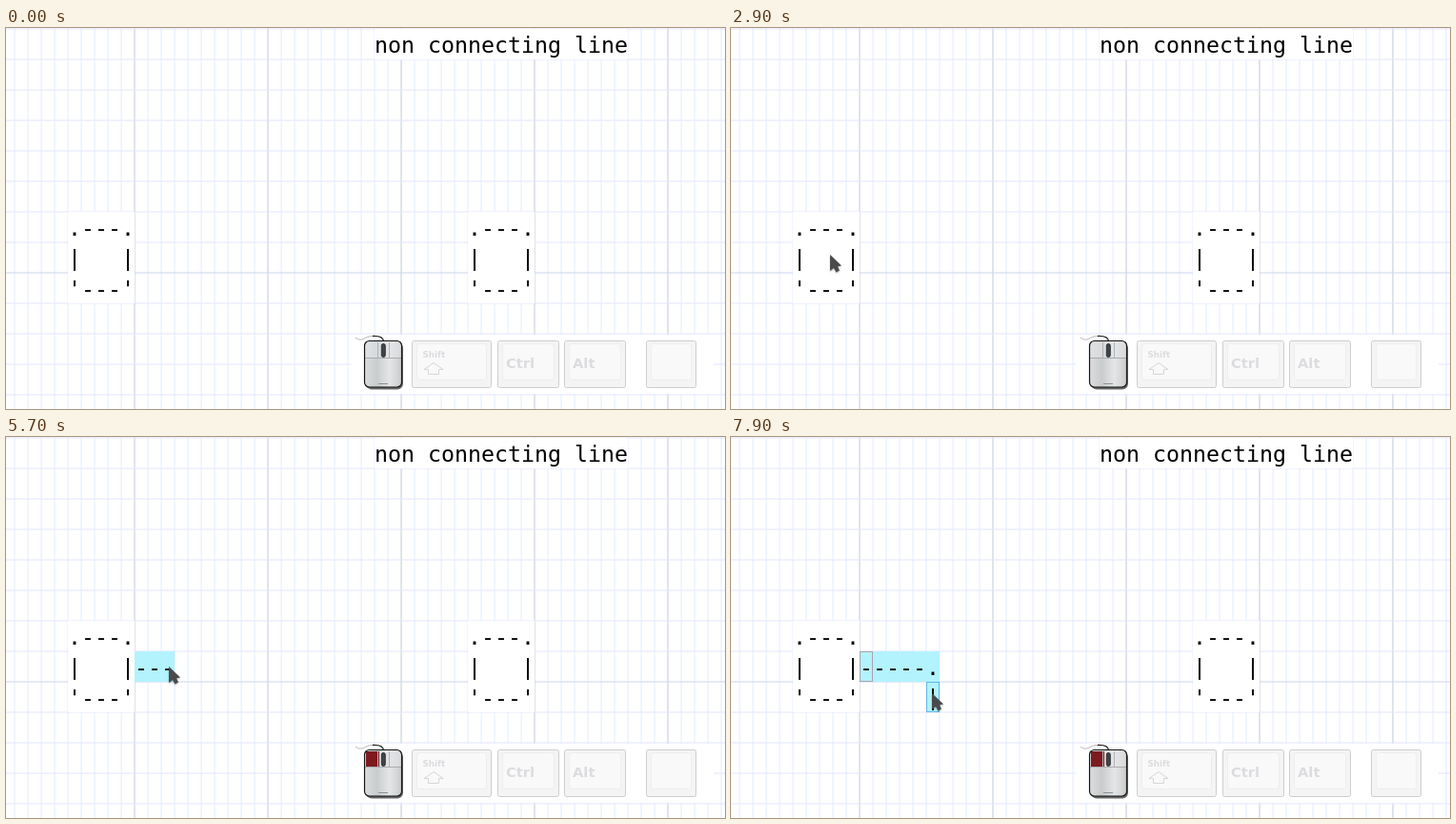
Write an HTML page with a canvas that moves like this. It is 755 px wide and 400 px high and loops after 8000 ms.

```html
<!DOCTYPE html>
<html lang="en">
<head>
<meta charset="utf-8">
<title>Non connecting line</title>
<style>
  html, body { margin: 0; width: 100%; height: 100%; overflow: hidden; background: #fff; }
  canvas { display: block; width: 755px; height: 400px; }
</style>
</head>
<body>
<canvas id="stage"></canvas>
<script>
const W = 755, H = 400, LOOP = 8000, STEP = 100;
const CW = 14, CH = 32;            // character cell
const BOX_X = 65, BOX_Y = 193;
const LINE_X = BOX_X + 5 * CW, LINE_Y = BOX_Y + CH;

const canvas = document.getElementById('stage');
const ratio = window.devicePixelRatio || 1;
canvas.width = W * ratio;
canvas.height = H * ratio;
// An opaque canvas allows subpixel text
const ctx = canvas.getContext('2d', { alpha: false });
ctx.scale(ratio, ratio);

// Pointer glides, each easing out and then resting
const home = { x: 41, y: 18 };
const glides = [
  { from: 300, to: 900, x: 104, y: 238 },
  { from: 3800, to: 4000, x: 175, y: 228 },
  { from: 4100, to: 4300, x: 175, y: 240 },
  { from: 4400, to: 4700, x: 158, y: 240 },
  { from: 4800, to: 5200, x: 171, y: 241 },
  { from: 5800, to: 6400, x: 310.5, y: 243 },
  { from: 6600, to: 7300, x: 304, y: 325 },
  { from: 7400, to: 7500, x: 301, y: 305 },
  { from: 7500, to: 7900, x: 211, y: 269 }
];

const between = (t, a, b) => t >= a && t < b;

function pointer(t) {
  let { x, y } = home;
  for (const g of glides) {
    const u = Math.min(1, Math.max(0, (t - g.from) / (g.to - g.from)));
    const k = 1 - (1 - u) ** 2;
    x += (g.x - x) * k;
    y += (g.y - y) * k;
  }
  return { x, y };
}

function fill(x, y, w, h, color) {
  ctx.fillStyle = color;
  ctx.fillRect(x, y, w, h);
}

function frame(x, y, w, h, color) {
  ctx.strokeStyle = color;
  ctx.lineWidth = 1;
  ctx.strokeRect(x + 0.5, y + 0.5, w - 1, h - 1);
}

function stroke(color, x0, y0, x1, y1) {
  ctx.strokeStyle = color;
  ctx.lineWidth = 1;
  ctx.beginPath();
  ctx.moveTo(x0, y0);
  ctx.lineTo(x1, y1);
  ctx.stroke();
}

function shape(path, color, edge, width = 1) {
  const p = typeof path === 'string' ? new Path2D(path) : path;
  if (color) {
    ctx.fillStyle = color;
    ctx.fill(p);
  }
  if (edge) {
    ctx.strokeStyle = edge;
    ctx.lineWidth = width;
    ctx.stroke(p);
  }
}

function rounded(x, y, w, h, r) {
  const p = new Path2D();
  p.roundRect(x, y, w, h, r);
  return p;
}

function shade(x0, y0, x1, y1, ...colors) {
  const g = ctx.createLinearGradient(x0, y0, x1, y1);
  colors.forEach((c, i) => g.addColorStop(i / (colors.length - 1), c));
  return g;
}

// Text on the character grid, one cell per glyph
function cells(text, x, y, back) {
  fill(x, y, text.length * CW, CH, back);
  ctx.fillStyle = '#000';
  ctx.font = '23.25px "DejaVu Sans Mono", monospace';
  [...text].forEach((c, i) => ctx.fillText(c, x + i * CW, y + 25));
}

function label(text, x, y, size, color) {
  ctx.font = `bold ${size}px "DejaVu Sans", sans-serif`;
  ctx.fillStyle = color;
  ctx.fillText(text, x, y);
}

function grid() {
  for (let i = 1; 9 + (i - 1) * CW < W; i++) {
    const x = 9 + (i - 1) * CW;
    stroke(i % 10 ? '#e2ecff' : '#c2c8d8', x, 0, x, H);
  }
  for (let i = 0; i * CH < H; i++) {
    const y = 1 + i * CH;
    stroke(i === 8 ? '#cbd5ee' : '#e2e5ff', 0, y, W, y);
  }
}

function box(x) {
  ['.---.', '|   |', "'---'"].forEach((row, i) => cells(row, x, BOX_Y + i * CH, '#fff'));
}

function key(x, w, on) {
  shape(rounded(x + 0.5, 328.5, w - 1, 49, 2), on ? '#d4d4d4' : '#f4f4f4', on ? '#444' : '#cdcdcd');
  shape(rounded(x + 5.5, 331.5, w - 11, 38, 3), on ? '#efefef' : '#f9f9f9', on ? '#fafafa' : '#eee');
}

function mouse(pressed) {
  shape('M367 325 C374 331 377 323 385 323.5', null, '#b4b4b4');
  shape('M385 323.5 Q396 323 396.5 329', null, '#222', 1.3);

  const body = rounded(376.5, 328.5, 39, 48.5, 5);
  shape(rounded(378, 330, 39, 49.5, 6), 'rgba(0,0,0,.6)');
  shape(body, shade(376, 0, 416, 0, '#dcddde', '#c9cccd', '#e4e5e6', '#c8cacb'));
  fill(378, 330, 37, 16, 'rgba(228,230,231,.55)');
  if (pressed) fill(378, 330, 14, 16, '#7d1a20');
  stroke('#a9acae', 377, 346.5, 415, 346.5);
  stroke('#b0b3b5', 390.5, 330, 390.5, 346);
  stroke('#b0b3b5', 402.5, 330, 402.5, 346);
  stroke('#8e9193', 391, 373.5, 401, 373.5);
  shape(body, null, '#151515', 1.2);
  shape(rounded(394.3, 331.5, 4, 14, 2), '#3f454a', '#1c2022', 0.8);
}

function panel(pressed, letter) {
  fill(362, 322, 381, 62, '#fff');
  mouse(pressed);
  const dim = '#dcdce0';
  key(426, 84);
  label('Shift', 437.5, 346, 8.8, dim);
  shape('M449 351.5 l10 7 h-4.5 v5 h-11 v-5 h-4.5 z', null, '#d6d6d9');
  key(516, 65);
  label('Ctrl', 525, 357, 14.7, dim);
  key(586, 65);
  label('Alt', 595, 357, 14.7, dim);
  key(672, 53, letter);
  if (letter) label(letter, 682, 357, 14.7, '#222');
}

function arrow({ x, y }) {
  ctx.save();
  ctx.translate(x, y);
  ctx.shadowColor = 'rgba(0,0,0,.3)';
  ctx.shadowBlur = 2;
  ctx.shadowOffsetY = 1;
  shape('M0 0 V17 L4 14 L6.5 18.6 L10 16.6 L8 12.3 L12 11.5 Z', '#4a4a4c');
  ctx.restore();
}

// The free end follows the pointer one step late
function line(t) {
  if (t < 3300) return;
  const drag = t >= 5900;
  const back = t >= 5000 ? '#b2f3fd' : '#fff';
  let col = 2, row = 0;
  if (drag) {
    const { x, y } = pointer(t - STEP);
    col = Math.floor((x - LINE_X) / CW);
    row = Math.max(0, Math.floor((y - LINE_Y) / CH));
  }
  const endX = LINE_X + col * CW;
  cells('-'.repeat(col) + (row ? '.' : '-'), LINE_X, LINE_Y, back);
  for (let r = 1; r <= row; r++) cells('|', endX, LINE_Y + r * CH, back);
  if (drag) frame(endX, LINE_Y + row * CH, CW, CH, '#62b6ea');
  if (drag || between(t, 3900, 5000)) frame(LINE_X, LINE_Y, CW, CH, drag ? '#a9a3ae' : '#b5b0b5');
}

// Connector marks around the left box and its resize corner
function handles(t) {
  if (!between(t, 3300, 5000)) return;
  const mark = (col, row) => frame(BOX_X + col * CW + 4, BOX_Y + row * CH + 10, 6, 12, '#eacb8c');
  mark(-1, 1);
  mark(5, 1);
  mark(2, -1);
  mark(2, 3);
  frame(BOX_X + 4 * CW, BOX_Y + 2 * CH, CW, CH, '#3f8a45');
}

function draw(now) {
  const t = Math.floor((now % LOOP) / STEP) * STEP;
  fill(0, 0, W, H, '#fff');
  grid();
  cells('non connecting line', 387, 1, '#fff');
  box(BOX_X);
  box(BOX_X + 30 * CW);
  line(t);
  handles(t);
  const pressed = between(t, 5000, 5200) || t >= 5700;
  const letter = between(t, 2100, 2900) ? 'I' : between(t, 3300, 3900) ? 'L' : '';
  panel(pressed, letter);
  if (t >= glides[0].from) arrow(pointer(t));
}

const start = performance.now();
function tick() {
  draw(performance.now() - start);
  requestAnimationFrame(tick);
}
tick();
</script>
</body>
</html>
```
